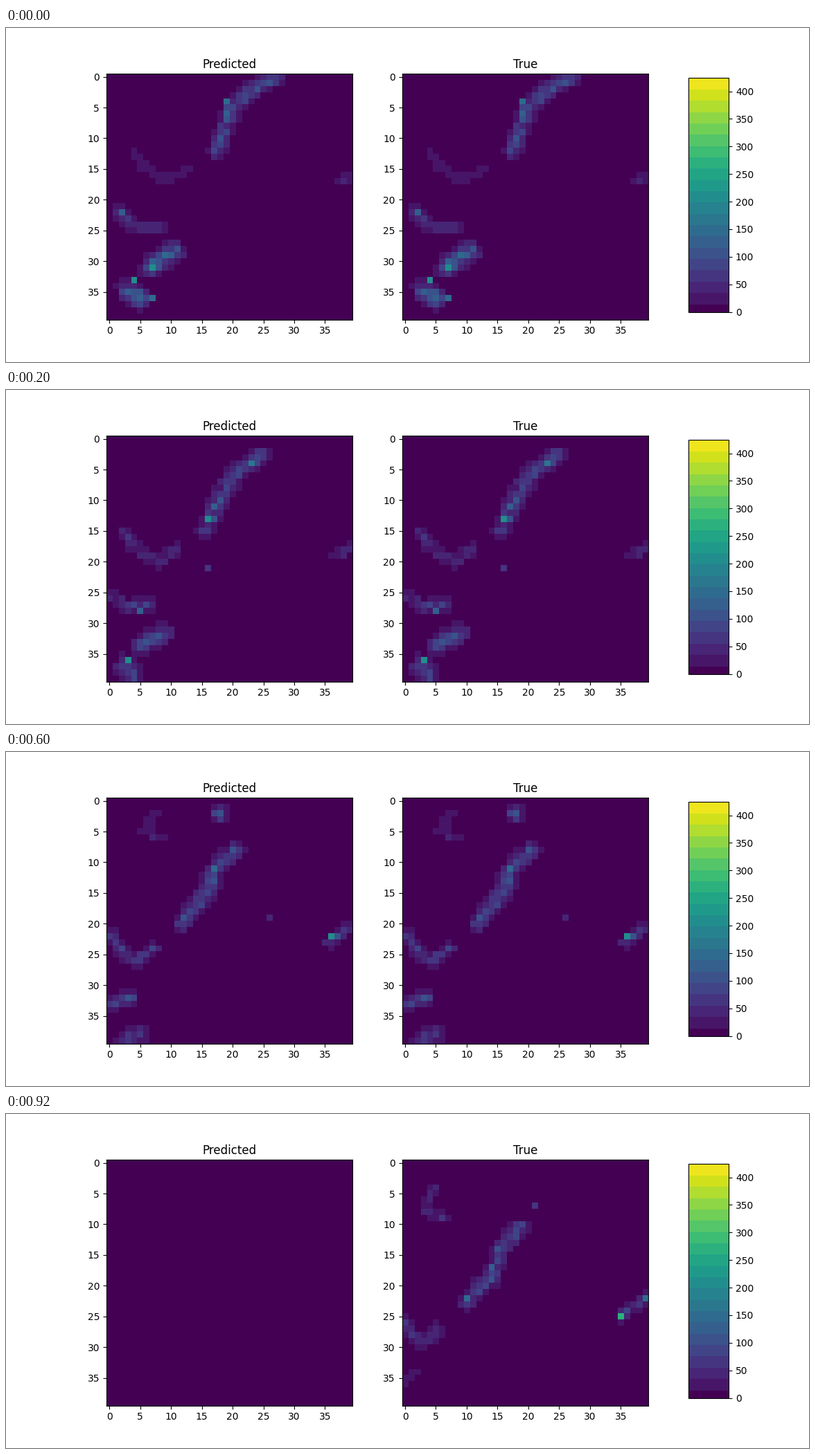
A matplotlib script that plays this animation: 1159x483 px, repeating every 1 s.

```python
import numpy as np
import matplotlib.pyplot as plt
from matplotlib.animation import FuncAnimation
from matplotlib.cm import ScalarMappable
from matplotlib.colors import ListedColormap, Normalize

W, H, DPI = 1159, 483, 100
SIZE, STEPS = 40, 5
VMAX, FIRST, BANDS = 424, 13.8, 20

plt.rcParams["font.family"] = "DejaVu Sans"

# Each rain system drifts from its first path to its last:
# (first path, last path, width, strength at each step)
FRONT = ([(27, 0), (22.5, 2.5), (19.5, 6), (17.5, 12)],
         [(18.5, 10.5), (15.5, 14), (14, 18.5), (10, 22.5)],
         1.25, (82, 80, 88, 78, 76))
HOOK = ([(3.7, 12.5), (6, 15), (9, 17), (12.5, 15)],
        [(-1, 25), (1, 28), (3, 29.2), (5.5, 27)],
        1.0, (24, 46, 55, 60, 55))
WEST = ([(1.5, 22), (4.5, 24.7), (8, 24.5)],
        [(-3, 37), (0, 35.5), (2.2, 34.3)],
        1.05, (58, 60, 72, 65, 25))
SOUTH = ([(6.5, 31), (10.5, 28.5)], [(0.7, 41.5), (3.5, 41)],
         1.4, (105, 85, 55, 45, 0))
CORNER = ([(3, 35), (5, 36)], [(0, 44), (0, 44)],
          1.5, (110, 75, 25, 0, 0))
EAST = ([(37.5, 17), (40, 16)], [(35, 25), (39.5, 21.5)],
        0.9, (32, 50, 55, 65, 65))
NORTH = ([(24.5, -3.5)], [(15.5, 4)], 1.2, (0, 0, 65, 95, 0))
DRIZZLE = ([(14.5, -4), (13, -4), (14, -3)], [(5, 4), (3, 8), (6.5, 9)],
           0.85, (0, 0, 20, 26, 36))
SYSTEMS = [FRONT, HOOK, WEST, SOUTH, CORNER, EAST, NORTH, DRIZZLE]

# Strongest single cells: step, x, y, rain
CORES = [(0, 4, 33, 210), (0, 7, 36, 145), (0, 2, 22, 135), (0, 19, 4, 140),
         (1, 16, 13, 215), (1, 3, 36, 205), (1, 5, 28, 135), (1, 16, 21, 60),
         (2, 14, 16, 424), (2, 15, 16, 200), (2, 17, 12, 170), (2, 3, 30, 205),
         (3, 36, 22, 205), (3, 17, 11, 145), (3, 26, 19, 45),
         (4, 35, 25, 280), (4, 39, 22, 150), (4, 10, 22, 145), (4, 21, 7, 60)]


def distance(path):
    """Distance of every cell from a polyline."""
    s = np.linspace(0, len(path) - 1, 80)
    px, py = (np.interp(s, np.arange(len(path)), c) for c in path.T)
    y, x = np.mgrid[:SIZE, :SIZE]
    return np.hypot(x[..., None] - px, y[..., None] - py).min(axis=2)


def rain(step):
    t = step / (STEPS - 1)
    grid = np.zeros((SIZE, SIZE))
    for first, last, width, strength in SYSTEMS:
        path = (1 - t) * np.array(first) + t * np.array(last)
        glow = strength[step] * np.exp(-(distance(path) / width) ** 2)
        grid = np.maximum(grid, glow)
    grain = np.random.default_rng(step).lognormal(0, 0.25, grid.shape)
    grid = np.where(grid * grain > FIRST, grid * grain, 0)
    for when, x, y, value in CORES:
        if when == step:
            grid[y, x] = value
    return grid


def banded_viridis():
    v = (np.arange(1024) + 0.5) / 1024 * VMAX
    width = (VMAX - FIRST) / BANDS
    band = np.ceil((v - FIRST) / width)
    mid = np.where(band > 0, FIRST + width * (band - 0.5), 0)
    return ListedColormap(plt.get_cmap("viridis")(mid / VMAX))


observed = [rain(i) for i in range(STEPS)]
blank = np.zeros((SIZE, SIZE))
forecast = observed[:-1] + [blank]

cmap, norm = banded_viridis(), Normalize(0, VMAX)
fig, axes = plt.subplots(1, 2, figsize=(W / DPI, H / DPI), dpi=DPI)
fig.subplots_adjust(right=0.8)


def panel(ax, title):
    ax.set_title(title)
    ax.set_xticks(range(0, SIZE, 5))
    ax.set_yticks(range(0, SIZE, 5))
    return ax.imshow(blank, cmap=cmap, norm=norm, interpolation="nearest")


predicted = panel(axes[0], "Predicted")
true = panel(axes[1], "True")
fig.colorbar(ScalarMappable(norm, cmap), ticks=range(0, 401, 50),
             cax=fig.add_axes([0.85, 0.15, 0.05, 0.7]))


def update(i):
    predicted.set_data(forecast[i])
    true.set_data(observed[i])
    return predicted, true


anim = FuncAnimation(fig, update, frames=STEPS, interval=200,
                     repeat=True, repeat_delay=0)
plt.show()
```
